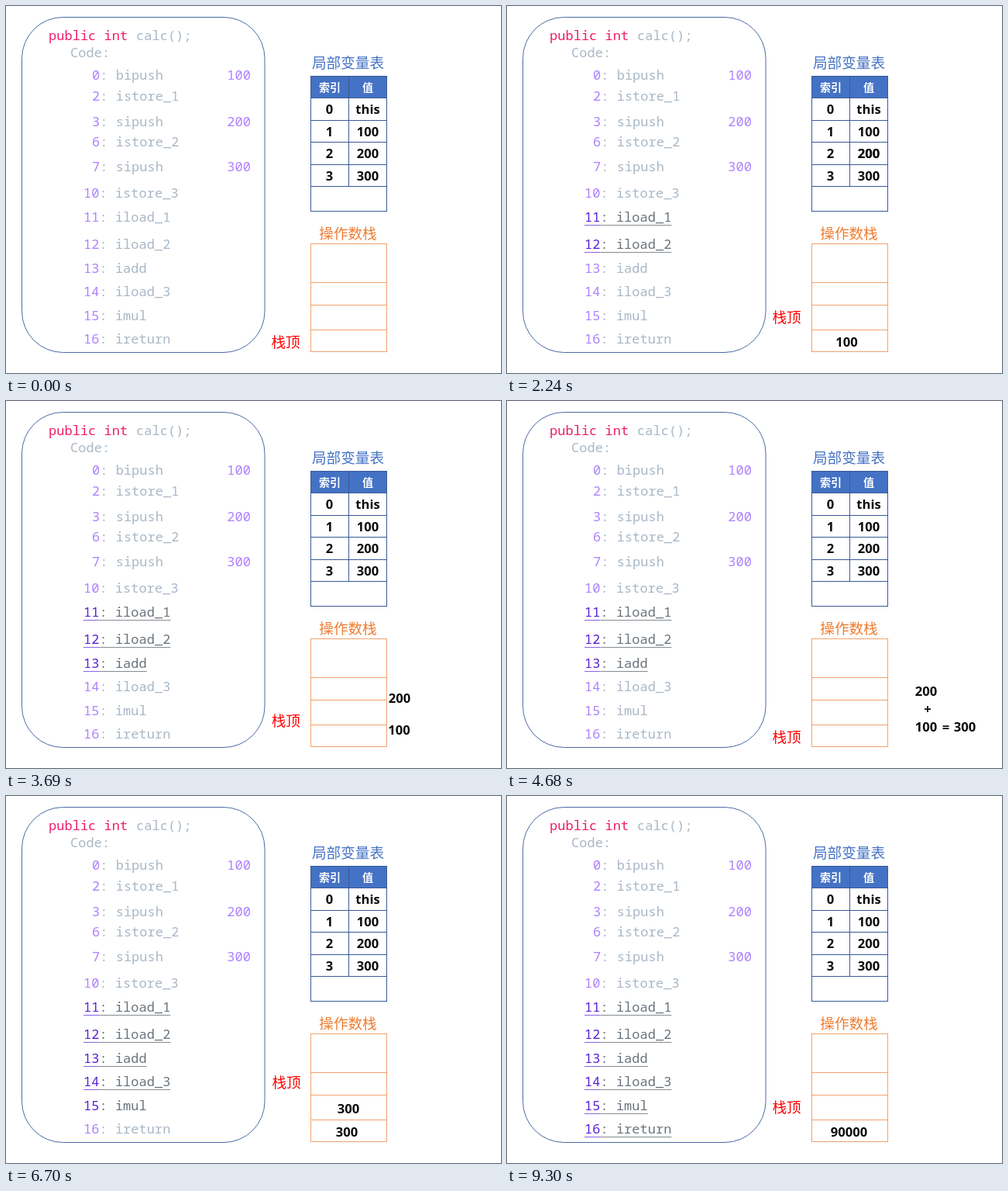
These frames come from a looping animation (639 by 473 pixels, 9550 ms). An HTML page:

```html
<!DOCTYPE html>
<html lang="zh">
<head>
<meta charset="utf-8">
<title>Operand stack</title>
<style>
  html, body { margin: 0; width: 100%; height: 100%; overflow: hidden; background: #fff; }
  svg { display: block; }
  text { white-space: pre; }
  .code { font: 17px "Noto Sans Mono", "DejaVu Sans Mono", monospace; letter-spacing: .02px; }
  .num { font: bold 16.6px "Noto Sans", "Open Sans", sans-serif; text-anchor: middle; fill: #0a0a0a; }
  .cjk { font: 500 18.6px "Noto Sans CJK SC", "Noto Sans CJK", sans-serif; text-anchor: middle; }
  .head { font-size: 14px; font-weight: bold; fill: #fff; }
</style>
</head>
<body>
<svg id="stage" width="639" height="473" viewBox="0 0 639 473"></svg>
<script>
const LOOP = 9550, MOVE = 520, FADE = 360;
const stage = document.getElementById('stage');
const GREY = [169, 183, 198], DARK_GREY = [105, 115, 124];
const PURPLE = [174, 129, 255], DARK_PURPLE = [88, 32, 214];
const BLUE = '#4472c4', BLUE_LINE = '#3a5a98', ORANGE = '#ed7d31', ORANGE_LINE = '#f2a26e';

function add(tag, attrs, content) {
  const node = document.createElementNS('http://www.w3.org/2000/svg', tag);
  for (const key in attrs) node.setAttribute(key, attrs[key]);
  if (content) node.textContent = content;
  return stage.appendChild(node);
}
const rgb = c => `rgb(${c.map(Math.round)})`;
const text = (cls, x, y, s, fill) => add('text', fill ? { class: cls, x, y, fill } : { class: cls, x, y }, s);
const line = (x1, y1, x2, y2, stroke) => add('line', { x1, y1, x2, y2, stroke });
const box = (x, y, w, h, stroke, fill = 'none', rx = 0) =>
  add('rect', { x, y, width: w, height: h, stroke, fill, rx });
const clamp = v => Math.min(1, Math.max(0, v));
const ease = v => v * v * (3 - 2 * v);
const mix = (a, b, k) => a + (b - a) * k;
const mixColor = (a, b, k) => rgb(a.map((v, i) => mix(v, b[i], k)));
const show = (node, on) => node.setAttribute('visibility', on ? 'visible' : 'hidden');

// Code panel
box(20.5, 14.5, 313.5, 432, '#4a6aa5', 'none', 53);
text('code', 55, 44, 'public int', '#ee1c68');
text('code', 168, 44, 'calc();', rgb(GREY));
text('code', 83, 66, 'Code:', rgb(GREY));

// index, instruction, baseline, operand or [darken, underline] times
const program = [
  [0, 'bipush', 95, '100'], [2, 'istore_1', 122], [3, 'sipush', 155, '200'],
  [6, 'istore_2', 181], [7, 'sipush', 213, '300'], [10, 'istore_3', 247],
  [11, 'iload_1', 278, [40, 860]], [12, 'iload_2', 313, [1180, 2240]],
  [13, 'iadd', 344, [2560, 3370]], [14, 'iload_3', 374, [5000, 6020]],
  [15, 'imul', 405, [6320, 7110]], [16, 'ireturn', 435, [8780, 9140]]
];
const active = [];
for (const [index, op, y, extra] of program) {
  const x = index < 10 ? 111 : 100;
  const colon = x + String(index).length * 10.22;
  const num = text('code', x, y, String(index), rgb(PURPLE));
  const body = text('code', colon, y, ': ' + op, rgb(GREY));
  if (typeof extra === 'string') text('code', 285.3, y, extra, rgb(PURPLE));
  if (Array.isArray(extra)) {
    const end = colon + (op.length + 2) * 10.22;
    const rules = [line(x, y + 4.5, colon, y + 4.5, '#8a63e4'),
                   line(colon, y + 4.5, end, y + 4.5, '#858b91')];
    active.push({ num, body, rules, dark: extra[0], under: extra[1] });
  }
}

// Local variable table
text('cjk', 441.5, 79.5, '局部变量表', BLUE);
box(393.5, 90.5, 98, 174, BLUE_LINE);
box(393.5, 90.5, 98, 28, BLUE_LINE, BLUE);
line(442.5, 91, 442.5, 232.5, BLUE_LINE);
text('cjk head', 418, 109.5, '索引');
text('cjk head', 467, 109.5, '值');
['this', '100', '200', '300'].forEach((value, i) => {
  const y = 118.5 + i * 28.5;
  const bottom = Math.floor(y + 28.5) + .5;
  line(393, bottom, 492, bottom, BLUE_LINE);
  text('num', 417.5, y + 20.5, String(i));
  text('num', 467, y + 20.5, value);
});

// Operand stack
text('cjk', 441.5, 299.5, '操作数栈', ORANGE);
box(393.5, 306.5, 98, 139, ORANGE_LINE);
for (const y of [356.5, 385.5, 417.5]) line(393, y, 492, y, ORANGE_LINE);

// Each stop is [start time, x, y, bow]; bow swings the path out to the right.
const mover = (node, x, y, from, to, stops) => ({ node, x, y, from, to, stops });
const token = (s, ...rest) => mover(text('num', 0, 0, s), ...rest);
const movers = [
  token('100', 467, 167, 860, 4720, [[860, 438.5, 438.5, 163], [3370, 541, 426]]),
  token('200', 467, 196, 2240, 4720, [[2240, 440, 407.5, 160], [3370, 541, 380]]),
  token('300', 591, 426, 4680, 8500, [[4720, 440, 438.5], [7110, 541, 426]]),
  token('300', 467, 224.5, 6020, 8500, [[6020, 442, 408.5, 158], [7110, 543, 378.5]]),
  token('90000', 601, 426, 8460, LOOP, [[8500, 441.5, 438.5]]),
  token('+', 543, 402.5, 4180, 4720, []),
  token('=', 566.5, 426, 4430, 4720, []),
  token('*', 543, 407, 7920, 8500, []),
  token('=', 566.5, 426, 8170, 8500, []),
  mover(text('cjk', 0, 0, '栈顶', '#ff0000'), 361, 440, 0, LOOP, [
    [860, 361, 408], [2240, 362, 376], [3370, 361, 440],
    [4720, 361, 408], [6020, 362, 376], [7110, 361, 440], [8500, 361, 408]
  ])
];

function place(m, t) {
  let { x, y } = m;
  for (const [start, toX, toY, bow = 0] of m.stops) {
    if (t < start) break;
    const k = ease(clamp((t - start) / MOVE));
    x = mix(x, toX, k) + 3 * k * (1 - k) * bow;
    // A bowed path leaves and arrives sideways.
    y = mix(y, toY, bow ? ease(k) : k);
  }
  m.node.setAttribute('x', x.toFixed(2));
  m.node.setAttribute('y', y.toFixed(2));
  show(m.node, t >= m.from && t < m.to);
}

function draw(t) {
  for (const a of active) {
    const k = clamp((t - a.dark) / FADE);
    a.num.setAttribute('fill', mixColor(PURPLE, DARK_PURPLE, k));
    a.body.setAttribute('fill', mixColor(GREY, DARK_GREY, k));
    for (const rule of a.rules) show(rule, t >= a.under);
  }
  for (const m of movers) place(m, t);
}

const begin = performance.now();
function tick() {
  draw((performance.now() - begin) % LOOP);
  requestAnimationFrame(tick);
}
tick();
</script>
</body>
</html>
```
